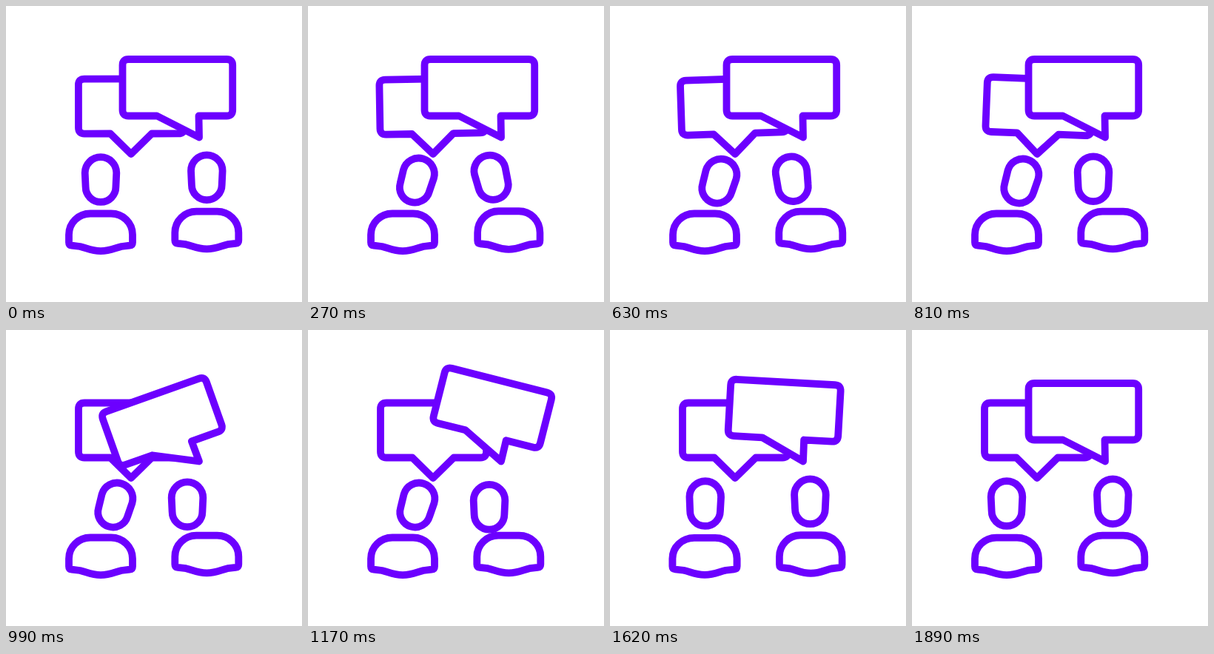
Animation of 400 by 400 pixels, one loop 1.92 s. Source, as an HTML page with a canvas:

```html
<!DOCTYPE html>
<html lang="en">
<head>
<meta charset="utf-8">
<title>Conversation</title>
<style>
html, body { margin: 0; width: 100%; height: 100%; overflow: hidden; background: #fff; }
canvas { display: block; width: 400px; height: 400px; }
</style>
</head>
<body>
<canvas id="stage"></canvas>
<script>
const LOOP = 1920, STEP = 30, SIZE = 400;
const canvas = document.getElementById('stage');
const ctx = canvas.getContext('2d');
const dpr = window.devicePixelRatio || 1;
canvas.width = canvas.height = SIZE * dpr;

// Shapes; heads and bodies are centred on the origin.
const backBubble = new Path2D(
  'M106 98.5H233Q241 98.5 241 106.5V164.5Q241 172.5 233 172.5H197L169 200L141 172.5H106Q98 172.5 98 164.5V106.5Q98 98.5 106 98.5Z');
const frontBubble = new Path2D(
  'M165.5 72H298.2Q306.2 72 306.2 80V140.5Q306.2 148.5 298.2 148.5H260.5L261 177.5L204 148.5H165.5Q157.5 148.5 157.5 140.5V80Q157.5 72 165.5 72Z');
const head = new Path2D(
  'M-21.3 -9A21.3 21.3 0 0 1 21.3 -9L20.4 10A20.4 20.4 0 0 1 -20.4 10Z');
const body = new Path2D(
  'M-43 3C-43 -13 -30 -25.5 -14 -25.5H14C30 -25.5 43 -13 43 3V13.5Q43 17.3 39 17.7L28 19C19 21 13 25.2 0 25.2C-13 25.2 -19 21 -28 19L-39 17.7Q-43 17.3 -43 13.5Z');

const clamp = p => Math.min(1, Math.max(0, p));
const ease = p => (1 - Math.cos(Math.PI * clamp(p))) / 2;
const ramp = (t, from, to) => ease((t - from) / (to - from));
const hump = (t, mid, half) => ease(1 - Math.abs(t - mid) / half);

// Angle of a bubble swinging to and fro, each swing 5 degrees smaller.
function swing(t) {
  const peak = i => i < 1 || i > 4 ? 0 : (-1) ** i * (25 - 5 * i);
  const i = Math.floor(t / 180);
  return peak(i) + (peak(i + 1) - peak(i)) * ease(t / 180 - i);
}

// Jelly wobble that dies out in half a second.
function wobble(t, size, period) {
  const fade = t < 0 ? 0 : clamp(1 - t / 500);
  return size * Math.sin(2 * Math.PI * t / period) * fade ** 2;
}

function shape(path, x, y, angle, squash = 0) {
  ctx.save();
  ctx.translate(x, y);
  ctx.rotate(angle * Math.PI / 180);
  ctx.scale(1 + squash, 1 - squash);
  ctx.fill(path);
  ctx.stroke(path);
  ctx.restore();
}

function drawBubble(path, x, y, angle) {
  ctx.save();
  ctx.translate(x, y);
  ctx.rotate(angle * Math.PI / 180);
  ctx.translate(-x, -y);
  shape(path, 0, 0, 0);
  ctx.restore();
}

function drawPeople(t) {
  // The heads lean together, settle a little, and part again.
  const lean = ramp(t, 0, 300) - ramp(t, 1355, 1655);
  const settle = lean * ramp(t, 270, 450);
  const nod = hump(t, 450, 200);
  const tilt = lean * (1 - ramp(t, 450, 810));
  const dip = 6 * hump(t, 1130, 230);

  const leftSquash = wobble(t, 0.07, 270) + wobble(t - 1500, 0.07, 270);
  const rightSquash = wobble(t, 0.09, 360) + wobble(t - 1410, 0.09, 360);

  shape(body, 128, 306, 0, leftSquash);
  shape(body, 271.3, 303.2, 0, rightSquash);
  shape(head, 128 + 19.5 * lean + 1.5 * nod, 234.5 + lean + settle + 2 * nod,
    16.4 * lean + 2.5 * nod);
  shape(head, 271.3 - 26.3 * lean + 2.3 * tilt, 231.7 + 2 * settle + dip, -14 * tilt);
}

function draw(t) {
  ctx.setTransform(dpr, 0, 0, dpr, 0, 0);
  ctx.fillStyle = '#fff';
  ctx.fillRect(0, 0, SIZE, SIZE);
  ctx.strokeStyle = '#6c00ff';
  ctx.lineWidth = 9.8;
  ctx.lineJoin = ctx.lineCap = 'round';
  drawPeople(t);
  drawBubble(backBubble, 169, 200, swing(t + 5));
  drawBubble(frontBubble, 261, 177.5, swing(t - 827));
}

const start = performance.now();
function tick() {
  const t = (performance.now() - start) % LOOP;
  draw(Math.floor(t / STEP) * STEP);
  requestAnimationFrame(tick);
}
tick();
</script>
</body>
</html>
```
